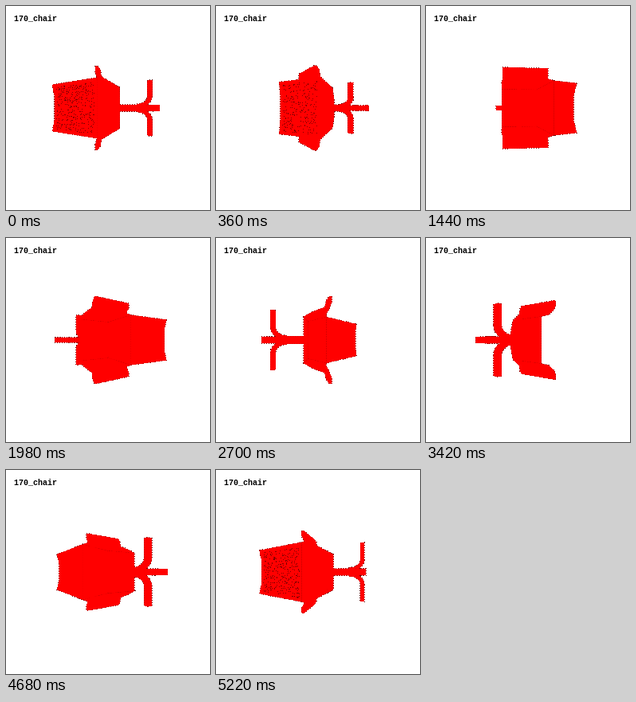
Animation of 256x256 px, one loop 5.4 s. Source, as an HTML page with a canvas:

```html
<!DOCTYPE html>
<html>
<head>
<meta charset="utf-8">
<style>
html, body { margin: 0; width: 100%; height: 100%; overflow: hidden; background: #fff; }
canvas { display: block; width: 256px; height: 256px; }
</style>
</head>
<body>
<canvas id="stage" width="256" height="256"></canvas>
<script>
(() => {
const SIZE = 256, MID = 128, EYE = 221;
const STEP = 180, STEPS = 30;
const ctx = document.getElementById('stage').getContext('2d', { willReadFrequently: true });

// Points are [height (down), side, depth].
const flip = p => [p[0], -p[1], p[2]];
const both = pts => pts.concat(pts.map(flip));

const crown = [-57, 23.8, 41], crownMid = [-55.5, 12, 38.5];
const waist = [-12, 33, 30];
const rear = [13.5, 24.5, 13], rearMid = [13.5, 10, 17];
const front = [15.5, 25, -33], frontSide = [4, 31, -33];

const lip = [[-15, 47], [-12, 47], [-9, 43], [-8, 36], [-8, 30], [-12, 36], [-15, 41]];
const arm = [];
for (const [u, v] of lip) {
  arm.push([u, v, v < 35 ? -26 : -31], [u + 0.5, v, 22.7]);
}
const shell = [front, frontSide, rear, waist, [-8, 36, -31], [-8, 30, -26], [-8, 36, 22.7]];

const solids = [
  arm, arm.map(flip),
  shell, shell.map(flip),
  both([front, rear, rearMid]),
  both([rear, rearMid, waist])
];
const back = [flip(crown), flip(crownMid), crownMid, crown, waist, flip(waist)];

// Stem and four bent legs
const HUB = -8, stem = [];
for (let i = 0; i < 8; i++) {
  const a = (i + 0.5) * Math.PI / 4;
  const v = 4.8 * Math.cos(a), w = HUB + 4.8 * Math.sin(a);
  stem.push([12, v, w], [42, v, w]);
}
solids.push(stem);

const bend = [];
for (let i = 0; i <= 6; i++) {
  const a = i * Math.PI / 12, s = Math.sin(a), c = Math.cos(a);
  bend.push([38 + 16.3 * s, 3 + 12 * (1 - c), c, s]);
}
bend.push([54.3, 35.8, 0, 1]);

function legSlice([u, r, c, s], k) {
  const pts = [];
  for (const n of [-2.4, 2.4]) {
    for (const e of [-3.5, 3.5]) {
      const du = u + n * s, dr = r - n * c;
      const out = k % 2 ? -dr : dr;
      pts.push(k < 2 ? [du, out, HUB + e] : [du, e, HUB + out]);
    }
  }
  return pts;
}
for (let k = 0; k < 4; k++) {
  for (let i = 1; i < bend.length; i++) {
    solids.push(legSlice(bend[i - 1], k).concat(legSlice(bend[i], k)));
  }
}

function projector(angle) {
  const c = Math.cos(angle), s = Math.sin(angle);
  return ([u, v, w]) => {
    const k = EYE / (EYE + u * s - w * c);
    return [MID + (u * c + w * s) * k, MID + v * k];
  };
}

function hull(pts) {
  pts.sort((a, b) => a[0] - b[0] || a[1] - b[1]);
  const chain = list => {
    const out = [];
    for (const p of list) {
      while (out.length > 1) {
        const a = out[out.length - 2], b = out[out.length - 1];
        if ((b[0] - a[0]) * (p[1] - a[1]) > (b[1] - a[1]) * (p[0] - a[0])) break;
        out.pop();
      }
      out.push(p);
    }
    out.pop();
    return out;
  };
  return chain(pts).concat(chain(pts.slice().reverse()));
}

function outline(pts) {
  const path = new Path2D();
  pts.forEach(p => path.lineTo(p[0], p[1]));
  path.closePath();
  return path;
}

function random(seed) {
  return () => (seed = (seed * 16807) % 2147483647) / 2147483647;
}

// Hard pixel edges
function sharpen() {
  const img = ctx.getImageData(0, 0, SIZE, SIZE), d = img.data;
  for (let i = 3; i < d.length; i += 4) d[i] = d[i] > 127 ? 255 : 0;
  ctx.putImageData(img, 0, 0);
}

function speckle(project, angle) {
  const amount = Math.max(0, (Math.cos(angle) - 0.7) / 0.3);
  const rnd = random(4127 + Math.round(angle * 1000));
  ctx.fillStyle = 'rgba(70,0,0,0.7)';
  for (let i = 0; i < 330 * amount; i++) {
    const t = 0.04 + 0.9 * rnd(), side = (rnd() * 2 - 1) * 0.9;
    const p = project([-55 + 43 * t, side * (23.5 + 9 * t), 39 - 9 * t]);
    ctx.fillRect(Math.floor(p[0]), Math.floor(p[1]), 1, 1);
  }
}

function draw(step) {
  const angle = step * 2 * Math.PI / STEPS;
  const project = projector(angle);
  const shapes = solids.map(s => outline(hull(s.map(project))));
  shapes.push(outline(back.map(project)));

  ctx.clearRect(0, 0, SIZE, SIZE);
  ctx.strokeStyle = '#500';
  ctx.lineWidth = 1.2;
  ctx.setLineDash([1, 2]);
  shapes.forEach(s => ctx.stroke(s));
  ctx.fillStyle = '#f00';
  shapes.forEach(s => ctx.fill(s));
  sharpen();
  speckle(project, angle);

  ctx.fillStyle = '#000';
  ctx.font = 'bold 10px "Liberation Mono", monospace';
  ctx.fillText('170_chair', 10, 19);
}

let shown = -1;
function tick() {
  const step = Math.floor(performance.now() / STEP) % STEPS;
  if (step !== shown) draw(shown = step);
  requestAnimationFrame(tick);
}
tick();
})();
</script>
</body>
</html>
```
